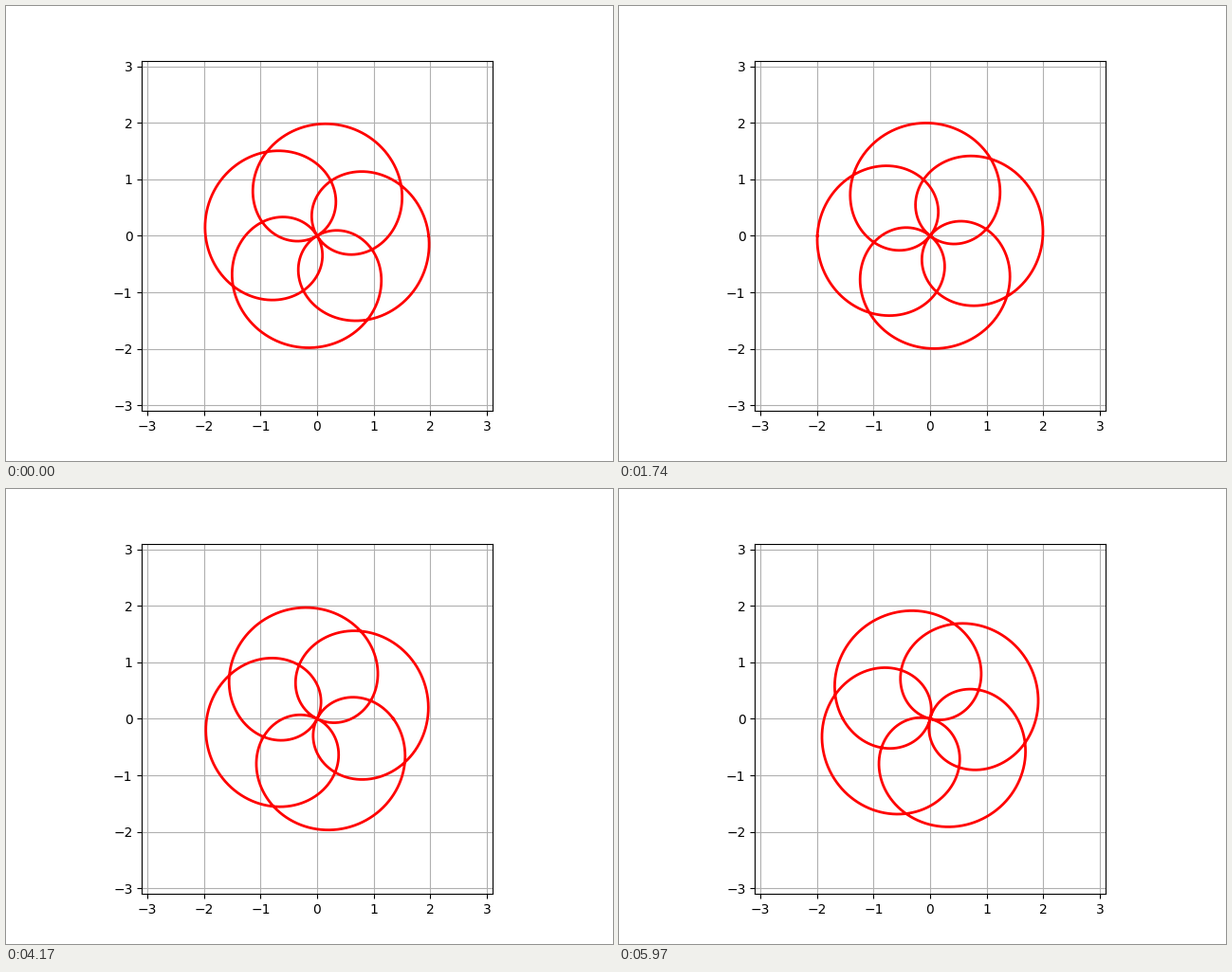
These frames come from a looping animation (640 by 480 pixels, 6000 ms). A matplotlib script:

```python
import numpy as np
import matplotlib.pyplot as plt
from matplotlib.animation import FuncAnimation

FRAMES = 200
INTERVAL = 30
PHASE = 0.164   # starting phase, rad
STEP = 0.05     # phase gain per frame, rad

theta = np.linspace(0, 6 * np.pi, 1500)

fig, ax = plt.subplots(figsize=(6.4, 4.8), dpi=100)
ax.set_aspect("equal")
ax.set_xlim(-3.1, 3.1)
ax.set_ylim(-3.1, 3.1)
ax.set_xticks(range(-3, 4))
ax.set_yticks(range(-3, 4))
ax.grid(True)
line, = ax.plot([], [], color="red", lw=2)


def update(i):
    """Four-petalled rose r = 2 cos(2θ/3 + phase)."""
    r = 2 * np.cos(2 * theta / 3 + PHASE + STEP * i)
    line.set_data(r * np.cos(theta), r * np.sin(theta))
    return line,


anim = FuncAnimation(fig, update, frames=FRAMES, interval=INTERVAL,
                     repeat=True, repeat_delay=0)
plt.show()
```
